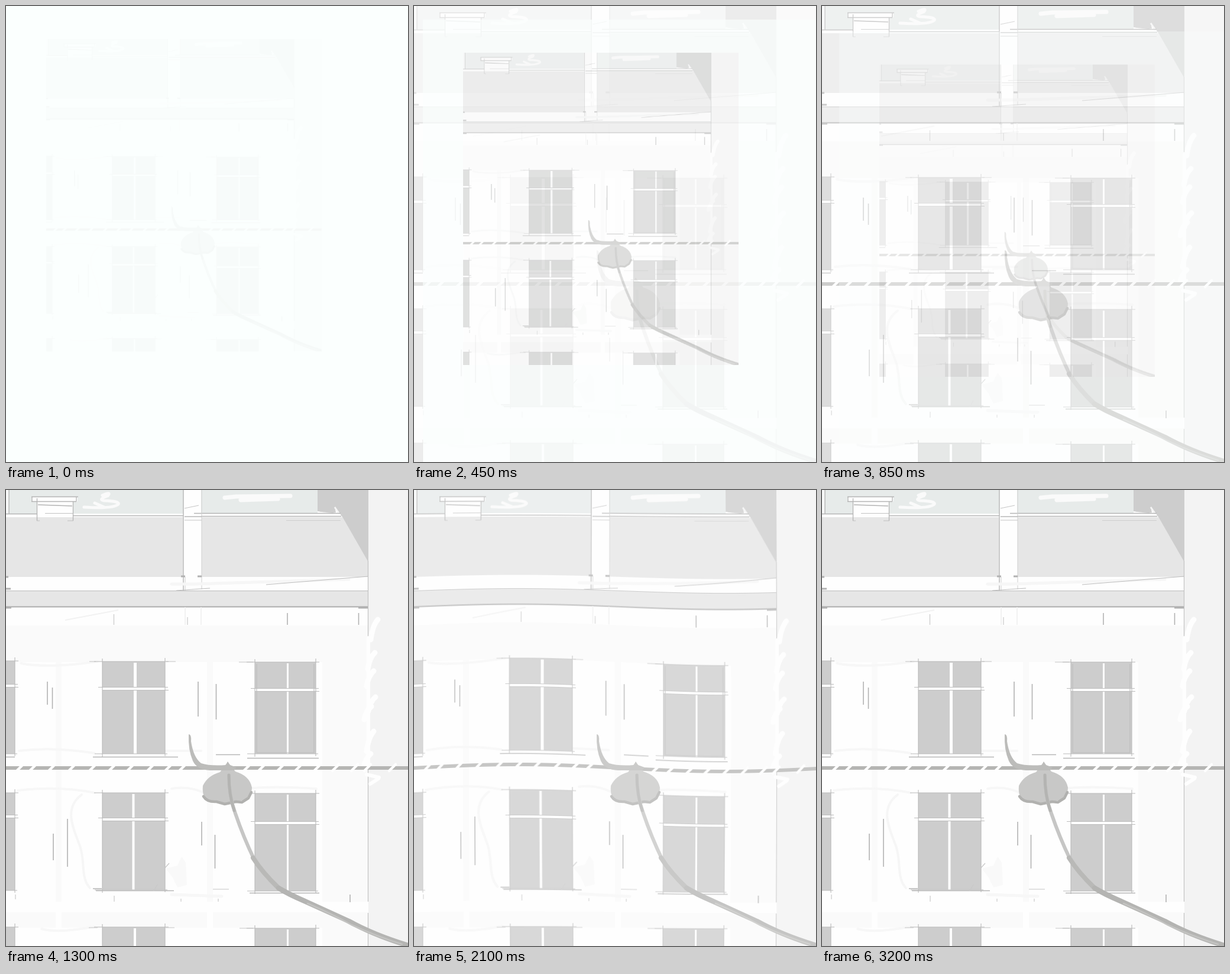
An HTML page with a canvas that plays this animation: 680 by 771 pixels, repeating every 3300 ms.

```html
<!DOCTYPE html>
<html>
<head>
<meta charset="utf-8">
<title>Facade</title>
<style>
html, body { margin: 0; width: 100%; height: 100%; overflow: hidden; background: #fff; }
canvas { display: block; width: 680px; height: 771px; }
</style>
</head>
<body>
<canvas id="stage" width="680" height="771"></canvas>
<script>
const W = 680, H = 771, LOOP = 3300, FADE = 1250, SMALL = 0.685;
const GLASS = '#cdcdcd', LINE = '#b6b6b6', ROOF = '#e6e6e6', WALL = '#fafafa', WHITE = '#fefefe';
const stage = document.getElementById('stage').getContext('2d');

function layer() {
  const c = document.createElement('canvas');
  c.width = W;
  c.height = H;
  const g = c.getContext('2d', { willReadFrequently: true });
  g.imageSmoothingQuality = 'high';
  return g;
}

function box(g, color, x, y, x2, y2) {
  g.fillStyle = color;
  g.fillRect(x, y, x2 - x, y2 - y);
}

function stroke(g, d, color = LINE, width = 1.3, cap = 'butt') {
  g.strokeStyle = color;
  g.lineWidth = width;
  g.lineCap = cap;
  g.lineJoin = 'round';
  g.stroke(new Path2D(d));
}

function fill(g, d, color) {
  g.fillStyle = color;
  g.fill(new Path2D(d));
}

function pane(g, x, y, x2, y2, bar, post, thick) {
  box(g, GLASS, x, y, x2, y2);
  if (post) box(g, WHITE, post - thick / 2, y + 2, post + thick / 2, y2);
  if (bar) {
    box(g, WHITE, x - 3, bar - 2, x2 + 4, bar + 2);
    stroke(g, `M${Math.max(0, x - 7)} ${bar - 2.5}H${x2 + 5}M${x} ${bar + 2.5}H${x2 + 6}`, '#bdbdbd', 1);
  }
  stroke(g, `M${x - 14} ${y}H${x2 + 6}M${x2} ${y - 6}V${y2 + 4}M${x} ${y - 5}V${y2 + 5}`, '#b9b9b9', 1.1);
  if (y2 < H) stroke(g, `M${x - 13} ${y2}H${x2 + 4}`, '#bbb', 1);
}

function drawRoof(g) {
  box(g, '#e7ebea', 5, 0, 300, 40);
  box(g, '#e7ebea', 330, 0, 527, 40);
  box(g, '#f7f8f8', 0, 0, 5, 40);
  box(g, ROOF, 0, 46, 299, 147);
  box(g, ROOF, 331, 46, 613, 147);
  box(g, ROOF, 0, 170, 613, 197);
  fill(g, 'M527 0H613V122L570 47L563 38L556 28L558 38L546 40L527 36Z', GLASS);
  stroke(g, 'M528 38L566 42', WHITE, 3);
  stroke(g, 'M556 29L565 42', '#f4f4f4', 3);
  stroke(g, 'M5 0V40M0 40.5H52M114 43.5H300M300 0V170M318 39.5H566M330 44.5H567', '#b5b5b5', 1.4);
  stroke(g, 'M114 41H298M330 42H566', WHITE, 2);
  stroke(g, 'M331 0V168M303 147V170M474 51.5H566', '#cfcfcf', 1);
  stroke(g, 'M302 31L326 26M302 51H331', '#c4c4c4', 1);
  stroke(g, 'M302 45H331', '#bbb', 1.6);
  // chimney
  box(g, WHITE, 52, 19, 113, 40);
  box(g, WHITE, 44, 11, 121, 19);
  stroke(g, 'M43 11.5H122M44 11V20M43 19.5H119M119 12V19M52.5 14V52M113.5 20V52M54 25L112 27', '#b4b4b4', 1.3);
  stroke(g, 'M66 39.5H113M52 52H57M104 52H114', '#c2c2c2', 1.2);
  // clouds
  stroke(g, 'M163 9Q179 2 172 10Q155 16 166 18Q193 19 190 24Q182 32 132 29M150 22L166 29', WALL, 5, 'round');
  stroke(g, 'M370 13L390 11L481 10M397 17L460 15', WALL, 7, 'round');
  // cornice
  stroke(g, 'M280 159H320L580 151', '#f6f6f6', 5, 'round');
  stroke(g, 'M0 170.5H613M288 170L345 166M440 160L613 146', '#bdbdbd', 1.1);
  stroke(g, 'M0 197.5H613', '#adadad', 1.9);
  stroke(g, 'M0 167H8M596 199H612M0 199H9M0 147H4M296 146H303M324 146H331', '#b2b2b2', 3);
  stroke(g, 'M100 220L190 203M303 198V228M330 198V228', '#f2f2f2', 2);
}

function drawWalls(g) {
  box(g, WALL, 0, 229, 612, 696);
  for (const [a, b] of [[0, 84], [94, 340], [350, 535]]) {
    box(g, WHITE, a, 291, b, 696);
    box(g, WALL, a, 714, b, 740);
    box(g, WHITE, a, 740, b, H);
  }
  box(g, WALL, 535, 714, 612, H);
  stroke(g, 'M25 293Q70 302 155 290M22 441Q80 434 150 445M270 441H330M20 508Q90 500 150 512M280 505Q310 500 335 512M405 505Q450 500 525 505M60 742Q90 750 150 738', '#f7f7f7', 4, 'round');
  stroke(g, 'M128 515C95 540 116 575 126 605C134 632 126 655 142 673', '#f6f6f6', 4, 'round');
  fill(g, 'M270 640L290 635L297 620L304 630L306 668L290 672L282 655Z', '#f9f9f9');
  stroke(g, 'M280 684L365 687', '#f7f7f7', 5, 'round');
}

function drawWindows(g) {
  pane(g, -12, 289, 15, 446, 331);
  pane(g, -12, 512, 15, 677, 552);
  pane(g, -12, 739, 15, H);
  pane(g, 163, 290, 269, 446, 336, 218.5, 5);
  pane(g, 421, 291, 524, 446, 338, 476.5, 3);
  pane(g, 163, 512, 269, 676, 557, 215.5, 4);
  pane(g, 421, 513, 524, 678, 563, 476.5, 3);
  pane(g, 163, 739, 269, H, 0, 218, 4);
  pane(g, 421, 741, 524, H, 0, 476.5, 3);
  stroke(g, 'M147 451.5H291M355 447.5H396M408 453.5H529M0 451.5H15M147 674H162M152 677.5H284M412 681.5H530', LINE, 1.3);
  stroke(g, 'M424 294V444H521V294', '#bdbdbd', 1.2);
  stroke(g, 'M141 290H152M271 290H287M394 291H418M350 675H377M140 740H155M270 740H285M395 741H418', '#c6c6c6', 1.2);
  stroke(g, 'M70 324V363M78.5 334V370M325 324V383M355.5 328V388M80 581V626M104 556V637M331 561V601M353.5 583V640M476 208V228M596.5 208V228M582 684V697', '#b2b2b2', 1.6);
  stroke(g, 'M182.5 210V228M307 215V228M16 684V692M183 686V696M296 691V696M359 691V696M250 678L256 667M268 640L276 631', '#c8c8c8', 1.2);
}

function drawSide(g) {
  box(g, '#f3f3f3', 613, 0, W, H);
  box(g, WHITE, 560, 697, 613, 714);
  stroke(g, 'M612.5 120V696M612.5 715V771', '#c3c3c3', 1.2);
  for (const [x, y, len] of [[629, 219, 34], [624, 275, 28], [622, 306, 26], [625, 350, 24], [618, 366, 22], [622, 408, 34], [617, 446, 24]])
    stroke(g, `M${x} ${y}Q${x - 9} ${y + len * 0.3} ${x - 12} ${y + len}`, WHITE, 9, 'round');
  stroke(g, 'M613 250V470M610 481L631 486M616 497L630 488', WHITE, 6, 'round');
}

function drawWire(g) {
  box(g, '#b5b5b3', 0, 467, W, 473);
  for (const x of [24, 46, 78, 112, 147, 180, 211, 245, 275, 299, 408, 433, 465, 495, 527, 558, 590, 612, 654])
    stroke(g, `M${x - 6} 475L${x + 5} 464`, WHITE, 4.5, 'round');
}

function drawLamp(g) {
  const head = 'M371 465L375 460L379 465L388 476Q412 483 416 503Q416 518 400 525Q375 533 343 527Q331 520 333 500Q341 483 362 477Z';
  fill(g, head, '#c8c8c7');
  stroke(g, 'M334 518Q340 528 356 527L370 531L389 527L399 528L410 521L415 511', '#b1b1af', 4.5, 'round');
  fill(g, 'M309 413Q314 413 313 425Q317 452 330 462Q345 467 372 465L375 459L379 465L390 469L386 474H345Q323 473 316 458Q308 440 309 413Z', '#bcbcba');
  stroke(g, 'M377 482Q377 518 388 547Q402 588 420 625', '#c6c6c5', 6, 'round');
  stroke(g, 'M377 482Q377 515 386 542', '#b4b4b2', 5, 'round');
  stroke(g, 'M418 622Q433 646 461 673Q479 685 505 695', '#b9b9b7', 8, 'round');
  stroke(g, 'M461 673Q480 684 505 695Q545 713 580 729Q625 754 690 773', '#b4b4b2', 8.5, 'round');
  stroke(g, 'M510 699Q552 717 584 735Q630 756 670 768', '#c3c3c1', 2.5, 'round');
}

const house = layer(), lamp = layer(), full = layer(), page = layer();
box(house, WHITE, 0, 0, W, H);
drawRoof(house);
drawWalls(house);
drawSide(house);
drawWindows(house);
drawWire(house);
drawLamp(lamp);
full.drawImage(house.canvas, 0, 0);
full.drawImage(lamp.canvas, 0, 0);

// Bends the facade: left half up, right half down; the lamp stays put.
function bend(k) {
  const src = house.getImageData(0, 0, W, H).data;
  const out = house.createImageData(W, H);
  const clamp = (v, max) => Math.min(Math.max(v, 0), max - 1.001);
  for (let y = 0; y < H; y++) {
    for (let x = 0; x < W; x++) {
      const s = k * Math.sin(Math.PI * y / H) * Math.sin(2 * Math.PI * x / 700);
      const sx = clamp(x + 1.7 * s, W), sy = clamp(y + 6.3 * s, H);
      const ix = sx | 0, iy = sy | 0, u = sx - ix, v = sy - iy;
      const p = (iy * W + ix) * 4, o = (y * W + x) * 4;
      for (let c = 0; c < 4; c++) {
        const top = src[p + c] * (1 - u) + src[p + c + 4] * u;
        const low = src[p + c + W * 4] * (1 - u) + src[p + c + W * 4 + 4] * u;
        out.data[o + c] = top * (1 - v) + low * v;
      }
    }
  }
  const g = layer();
  g.putImageData(out, 0, 0);
  g.drawImage(lamp.canvas, 0, 0);
  return g.canvas;
}

const poses = [
  { pic: full.canvas, alpha: 1 },
  { pic: bend(0.35), alpha: 0.92 },
  { pic: bend(0.68), alpha: 0.86 },
  { pic: bend(1), alpha: 0.76 }
];
const steps = [[3200, 0], [3000, 1], [2800, 2], [2100, 3], [1800, 2], [1600, 1], [0, 0]];

const inset = [[0, 0.08], [100, 0.4], [250, 0.8], [450, 0.91], [650, 0.96], [FADE, 1]];
function lerpKeys(keys, t) {
  const i = keys.findIndex(k => k[0] > t);
  if (i < 0) return keys[keys.length - 1][1];
  const [a, va] = keys[i - 1], [b, vb] = keys[i];
  return va + (vb - va) * (t - a) / (b - a);
}

function drawPage(t) {
  page.globalAlpha = 1;
  box(page, '#fbfffe', 0, 0, W, H);
  page.globalAlpha = lerpKeys(inset, t);
  page.drawImage(full.canvas, 68, 56, W * SMALL, H * SMALL);
  stage.globalAlpha = 1 - t / FADE;
  stage.drawImage(page.canvas, Math.floor(t * 0.035), Math.round(t * 0.05));
}

function frame(now) {
  let t = Math.floor(now % LOOP / 50) * 50;
  if (t < 100) t = 0;
  const pose = poses[steps.find(s => t >= s[0])[1]];
  stage.globalAlpha = 1;
  box(stage, '#fff', 0, 0, W, H);
  stage.globalAlpha = pose.alpha * Math.min(1, t / FADE);
  stage.drawImage(pose.pic, 0, 0);
  if (t < FADE) drawPage(t);
}

const start = performance.now();
function tick() {
  frame(performance.now() - start);
  requestAnimationFrame(tick);
}
tick();
</script>
</body>
</html>
```
